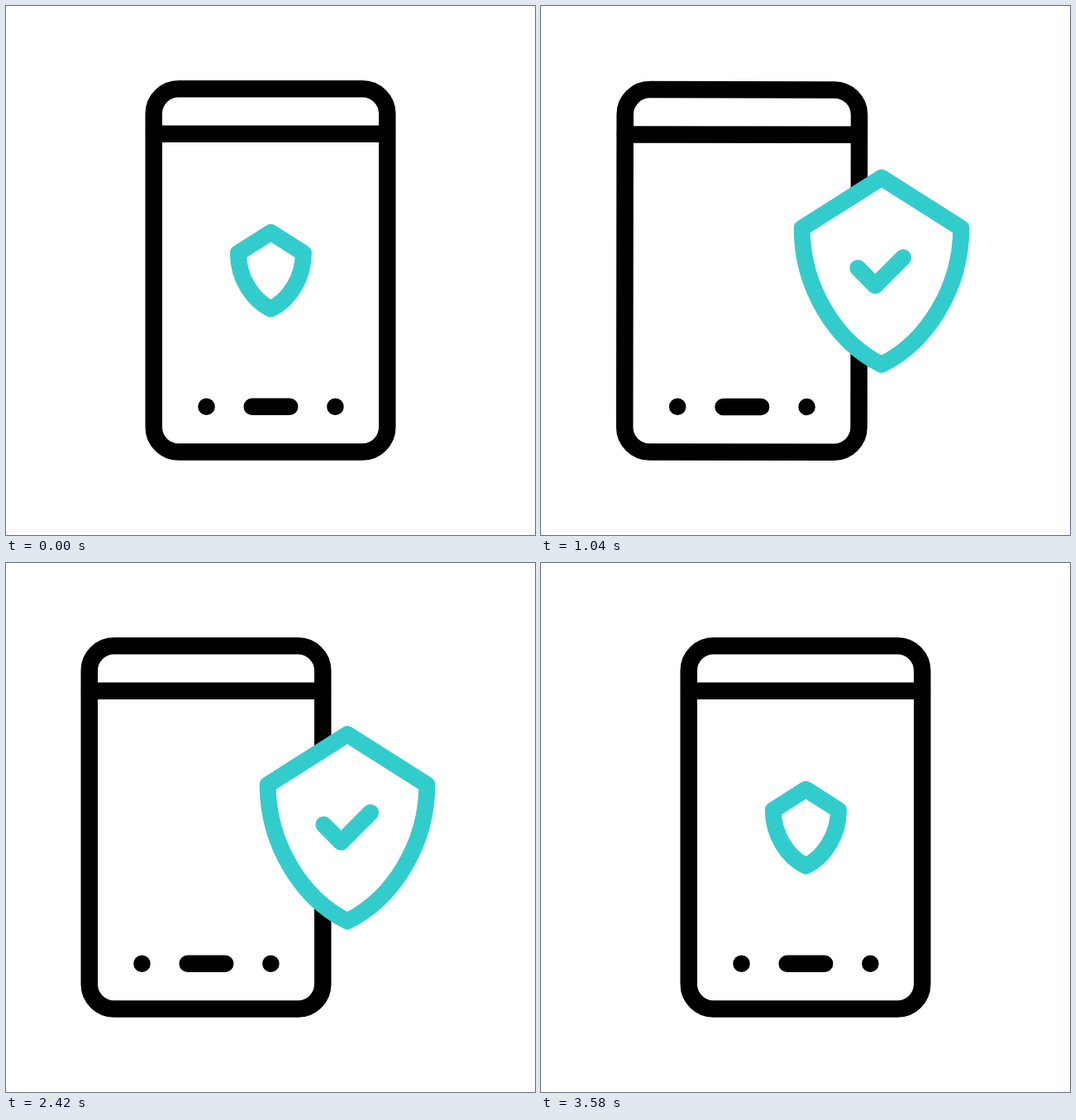
Write an HTML page with a canvas that moves like this. It is 640x640 px and loops after 3.6 s.

```html
<!DOCTYPE html>
<html lang="en">
<head>
<meta charset="utf-8">
<title>Phone protection</title>
<style>
  html, body { margin: 0; width: 100%; height: 100%; overflow: hidden; background: #fff; }
  canvas { display: block; width: 640px; height: 640px; }
</style>
</head>
<body>
<canvas id="stage" width="640" height="640"></canvas>
<script>
const ctx = document.getElementById('stage').getContext('2d');
const LOOP = 3600, BLACK = '#000', TEAL = '#33cccc';

const clamp = x => Math.min(1, Math.max(0, x));
const span = (t, from, to) => clamp((t - from) / (to - from));
const sine = x => (1 - Math.cos(Math.PI * x)) / 2;

// Timing curve with control points (x1, 0) and (x2, 1)
const ease = (x1, x2) => x => {
  let lo = 0, hi = 1;
  for (let i = 0; i < 24; i++) {
    const u = (lo + hi) / 2, v = 1 - u;
    if (3 * u * v * v * x1 + 3 * u * u * v * x2 + u * u * u < x) lo = u; else hi = u;
  }
  return lo * lo * (3 - 2 * lo);
};
const glide = ease(0.45, 0.1);
const back = ease(0.6, 0.3);
const soft = ease(0.42, 0.58);

// Builds a path in the current transform, then strokes it at a constant width
function stroke(path, color, width, fill) {
  ctx.beginPath();
  path();
  ctx.save();
  ctx.setTransform(1, 0, 0, 1, 0, 0);
  if (fill) { ctx.fillStyle = fill; ctx.fill(); }
  ctx.strokeStyle = color;
  ctx.lineWidth = width;
  ctx.lineCap = ctx.lineJoin = 'round';
  ctx.stroke();
  ctx.restore();
}

const phoneLine = path => stroke(path, BLACK, 20.5);
const shieldLine = (path, fill) => stroke(path, TEAL, 20, fill);

function bar(x1, x2, y) {
  phoneLine(() => { ctx.moveTo(x1, y); ctx.lineTo(x2, y); });
}

function drawPhone(t) {
  const out = t < 2000;
  const travel = out ? glide(span(t, 40, 1220)) : 1 - back(span(t, 2425, 3600));
  const kick = t < 500 ? soft(span(t, 40, 500)) : (1 - span(t, 500, 1300)) ** 3;
  const lean = t < 3120 ? span(t, 2450, 3120) ** 2 : 1 - soft(span(t, 3120, 3570));
  const angle = out ? 2.1 * kick : -2.08 * lean;

  ctx.save();
  ctx.translate(320 - 78 * travel, 539.6);
  ctx.rotate(angle * Math.PI / 180);
  if (out) ctx.scale(1 + 0.09 * kick, 1 - 0.0705 * kick);
  phoneLine(() => ctx.roundRect(-141.25, -439.4, 282.5, 439.4, 30));
  bar(-141, 141, -384.9);
  bar(-77.5, -77.45, -54.8);
  bar(-22.3, 23.2, -54.8);
  bar(78.4, 78.45, -54.8);
  ctx.restore();
}

function shieldPath() {
  ctx.moveTo(0, -113);
  ctx.lineTo(96.3, -52);
  ctx.bezierCurveTo(96.3, 20, 55, 86, 0, 113);
  ctx.bezierCurveTo(-55, 86, -96.3, 20, -96.3, -52);
  ctx.closePath();
}

function drawCheck(part) {
  const pts = [[-28.7, -3.8], [-7.7, 17.6], [28, -18.3]];
  let left = 80.6 * part;
  if (left <= 0) return;
  shieldLine(() => {
    ctx.moveTo(...pts[0]);
    for (let i = 1; i < pts.length && left > 0; i++) {
      const [ax, ay] = pts[i - 1], [bx, by] = pts[i];
      const len = Math.hypot(bx - ax, by - ay), k = Math.min(1, left / len);
      ctx.lineTo(ax + (bx - ax) * k, ay + (by - ay) * k);
      left -= len;
    }
  });
}

function drawShield(t) {
  // The way back mirrors the way out
  const clock = Math.min(t - 40, LOOP - 6 - t);
  const travel = glide(span(clock, 0, 1180));
  const grow = 0.41 + 0.59 * soft(span(clock, 0, 500));
  const pulse = t < 1760 ? sine(span(t, 1460, 1760)) : 1 - sine(span(t, 1760, 2075));
  const check = t < 2000
    ? 1 - (1 - span(t, 556, 1148)) ** 2
    : 1 - sine(span(t, 2500, 2900));
  const size = grow * (1 + 0.19 * pulse);

  ctx.save();
  ctx.translate(320.4 + 92.6 * travel, 320.2 + 48 * travel * (1 - travel));
  ctx.scale(size, size);
  shieldLine(shieldPath, '#fff');
  drawCheck(check);
  ctx.restore();
}

function draw(now) {
  const t = now % LOOP;
  ctx.fillStyle = '#fff';
  ctx.fillRect(0, 0, 640, 640);
  drawPhone(t);
  drawShield(t);
}

const start = performance.now();
function tick() {
  draw(performance.now() - start);
  requestAnimationFrame(tick);
}
tick();
</script>
</body>
</html>
```
